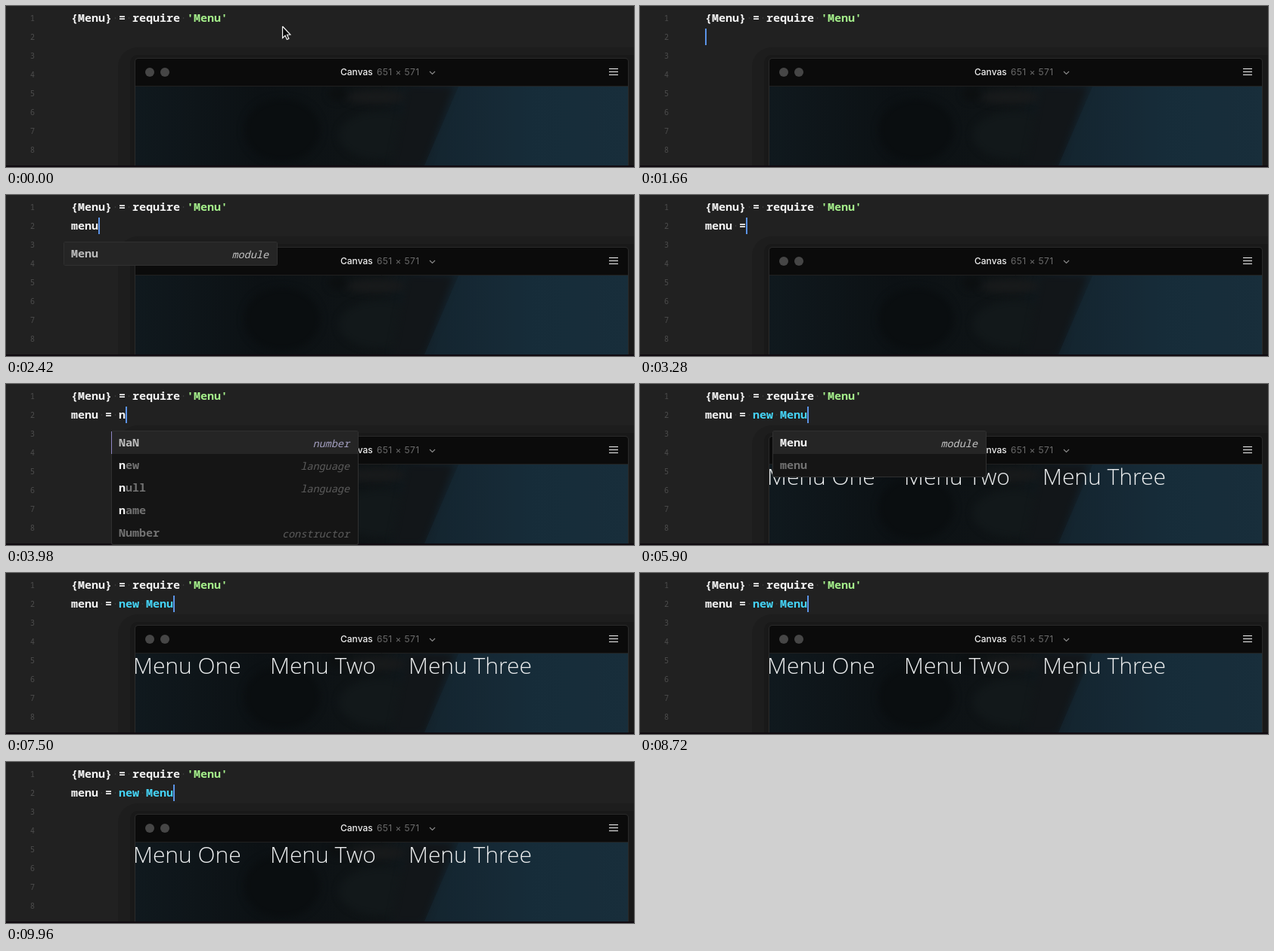
Write an HTML page with a canvas that moves like this. It is 830 by 214 pixels and loops after 9980 ms.

```html
<!DOCTYPE html>
<html lang="en">
<head>
<meta charset="utf-8">
<title>Code completion</title>
<style>
  html, body { margin: 0; width: 100%; height: 100%; overflow: hidden; background: #202020; }
  canvas { display: block; }
</style>
</head>
<body>
<canvas id="stage" width="830" height="214"></canvas>
<script>
const ctx = document.getElementById('stage').getContext('2d');
const LOOP = 9980, CHAR = 9, LEFT = 86;
const MONO = '"Noto Sans Mono", "DejaVu Sans Mono", monospace';
const SANS = 'Inter, Roboto, sans-serif';
const CODE = `600 15px ${MONO}`;
const CYAN = '#45d4f7', GREEN = '#a5f08b', WHITE = '#f4f4f4';

// Time of each key press and the second line after it
const keys = [
  [100, ''], [1760, 'm'], [1940, 'me'], [2120, 'men'], [2300, 'menu'],
  [2660, 'menu '], [3060, 'menu ='], [3400, 'menu = '],
  [3860, 'menu = n'], [4140, 'menu = ne'], [4320, 'menu = new'], [4600, 'menu = new '],
  [5040, 'menu = new M'], [5220, 'menu = new Me'], [5420, 'menu = new Men'], [5620, 'menu = new Menu']
];

const makers = ['Audio', 'Color', 'Layer', 'Gradient', 'Animation'].map(n => [n, 'constructor']);
const moduleRow = ['Menu', 'module'];
const mRows = [moduleRow, ['Math', 'object'], ['max', 'method'], ['min', 'method'], ['map', 'method']];
const nRows = [['NaN', 'number'], ['new', 'language'], ['null', 'language'], ['name', ''], ['Number', 'constructor']];

// Completion lists: start, end, word column, width, rows, typed part, first row selected
const popups = [
  [1780, 1960, 0, 362, mRows, 'm', true],
  [1960, 2680, 0, 282, [moduleRow], 'menu', true],
  [3880, 4160, 7, 326, nRows, 'n', true],
  [4160, 4600, 7, 326, [nRows[1]], 'ne', true],
  [4640, 5120, 11, 326, makers, '', false],
  [5120, 5240, 11, 361, mRows, 'M', true],
  [5240, 6080, 11, 282, [moduleRow, ['menu', '']], 'Menu', true]
];

function text(str, x, y, font, color, align = 'left') {
  ctx.font = font;
  ctx.fillStyle = color;
  ctx.textAlign = align;
  ctx.fillText(str, x, y);
}

function shape(color, ...points) {
  ctx.fillStyle = color;
  ctx.beginPath();
  points.forEach(p => ctx.lineTo(...p));
  ctx.closePath();
  ctx.fill();
}

function blob(color, x, y, rx, ry) {
  ctx.fillStyle = color;
  ctx.beginPath();
  ctx.ellipse(x, y, rx, ry, 0, 0, 7);
  ctx.fill();
}

function panel(color, x, y, w, h, r) {
  ctx.fillStyle = color;
  ctx.beginPath();
  ctx.roundRect(x, y, w, h, r);
  ctx.fill();
}

function line(color, width, ...points) {
  ctx.strokeStyle = color;
  ctx.lineWidth = width;
  ctx.beginPath();
  points.forEach(p => ctx.lineTo(...p));
  ctx.stroke();
}

// Monospaced run on the column grid, with faint dots for spaces
function code(str, col, y, color) {
  [...str].forEach((c, i) => {
    const x = LEFT + (col + i) * CHAR;
    if (c === ' ') blob('#454545', x + 4.5, y - 5, .8, .8);
    else text(c, x, y, CODE, color);
  });
}

function picture() {
  ctx.save();
  ctx.beginPath();
  ctx.rect(171, 107, 651, 107);
  ctx.clip();
  const sky = ctx.createLinearGradient(171, 0, 822, 0);
  [[0, '#10191e'], [.25, '#0c1114'], [.5, '#0f1416'], [.62, '#13212a'], [.8, '#162b37'], [1, '#182e3a']]
    .forEach(s => sky.addColorStop(...s));
  ctx.fillStyle = sky;
  ctx.fillRect(171, 107, 651, 107);
  ctx.filter = 'blur(5px)';
  blob('#0a0e10', 365, 165, 50, 42);
  blob('#181a1b', 490, 121, 42, 9);
  blob('#12181a', 495, 172, 55, 32);
  blob('#0c0f10', 438, 117, 11, 9);
  shape('#121619', [530, 107], [592, 107], [552, 214], [510, 214]);
  ctx.filter = 'none';
  shape('rgba(24,48,62,.35)', [598, 107], [822, 107], [822, 214], [552, 214]);
  ctx.restore();
}

function canvasWindow(showMenu) {
  panel('#1d1d1d', 148, 55, 720, 200, 26);
  panel('#191919', 164, 65, 700, 200, 10);
  panel('#2a2a2a', 170, 69, 653, 160, 5);
  panel('#0b0b0b', 171, 70, 651, 160, 4);
  picture();
  line('#202020', 1, [171, 106.5], [822, 106.5]);
  blob('#464646', 190, 88, 6, 6);
  blob('#464646', 210, 88, 6, 6);
  text('Canvas', 442, 92, `500 12px ${SANS}`, '#f0f0f0');
  ctx.letterSpacing = '.4px';
  text('651 × 571', 490, 92, `400 12px ${SANS}`, '#6b6b6b');
  ctx.letterSpacing = '0px';
  line('#8a8a8a', 1.2, [560, 87], [563.5, 90.5], [567, 87]);
  [83.5, 87.5, 91.5].forEach(y => line('#f4f4f4', 1, [797, y], [809, y]));
  if (!showMenu) return;
  [['One', 168], ['Two', 349], ['Three', 532]].forEach(([name, x]) =>
    text('Menu ' + name, x, 134, '300 30px "Open Sans", "Noto Sans", sans-serif', '#eceeef'));
}

function popup([, , col, width, rows, typed, selected]) {
  const x = LEFT + col * CHAR - 10, h = rows.length * 30 + 2;
  panel('#303030', x, 62, width + 1, h, 3);
  panel('#151515', x + 1, 63, width - 1, h - 2, 2);
  rows.forEach(([name, kind], i) => {
    const y = 83 + i * 30, active = selected && i === 0;
    if (active) {
      ctx.fillStyle = '#252525';
      ctx.fillRect(x + 1, 63, width - 1, 30);
      if (kind === 'number') line('#8f86c4', 1, [x + .5, 63], [x + .5, 93]);
    }
    const hit = name.startsWith(typed) ? typed.length : 0;
    [...name].forEach((c, j) =>
      text(c, x + 10 + j * CHAR, y, CODE, j < hit ? WHITE : active ? '#bdbdbd' : '#727272'));
    text(kind, x + width - 11, y + 1, `italic 500 13.5px ${MONO}`,
      !active ? '#5c5c5c' : kind === 'number' ? '#a39fc0' : '#c4c4c4', 'right');
  });
}

function caret(t, typedAt, length) {
  const p = t % 1000;
  const blink = Math.max(0, Math.min(1, (p - 380) / 100)) + Math.max(0, 1 - (p + 20) / 100);
  ctx.globalAlpha = t - typedAt < 500 ? 1 : p > 980 ? 1 - (p - 980) / 100 : Math.min(1, blink);
  ctx.fillStyle = '#5b93e6';
  ctx.fillRect(LEFT + length * CHAR, 30, 2, 22);
  ctx.globalAlpha = 1;
}

function pointer() {
  const arrow = [[365.5, 27], [365.5, 42.5], [369, 39.2], [371.3, 44.5], [373.8, 43.4], [371.5, 38.2], [375.8, 38], [365.5, 27]];
  shape('#080808', ...arrow);
  line('#f4f4f4', 1.2, ...arrow);
}

function draw(t) {
  ctx.fillStyle = '#212121';
  ctx.fillRect(0, 0, 830, 214);
  canvasWindow(t >= 5840);
  for (let i = 0; i < 9; i++) text(i + 1, 32, 20 + i * 25, `400 10px ${MONO}`, '#4d4d4d');
  ctx.fillStyle = '#100a10';
  ctx.fillRect(0, 212, 830, 2);

  code('{Menu} = require ', 0, 21, WHITE);
  code("'Menu'", 17, 21, GREEN);

  const key = keys.filter(k => k[0] <= t).pop();
  if (key) {
    const [typedAt, typed] = key;
    const done = typed.startsWith('menu = new');
    code(done ? 'menu = ' : typed, 0, 46, WHITE);
    if (done) code(typed.slice(7), 7, 46, CYAN);
    caret(t, typedAt, typed.length);
  } else pointer();

  const open = popups.find(p => t >= p[0] && t < p[1]);
  if (open) popup(open);
}

const start = performance.now();
function tick() {
  draw((performance.now() - start) % LOOP);
  requestAnimationFrame(tick);
}
tick();
</script>
</body>
</html>
```
